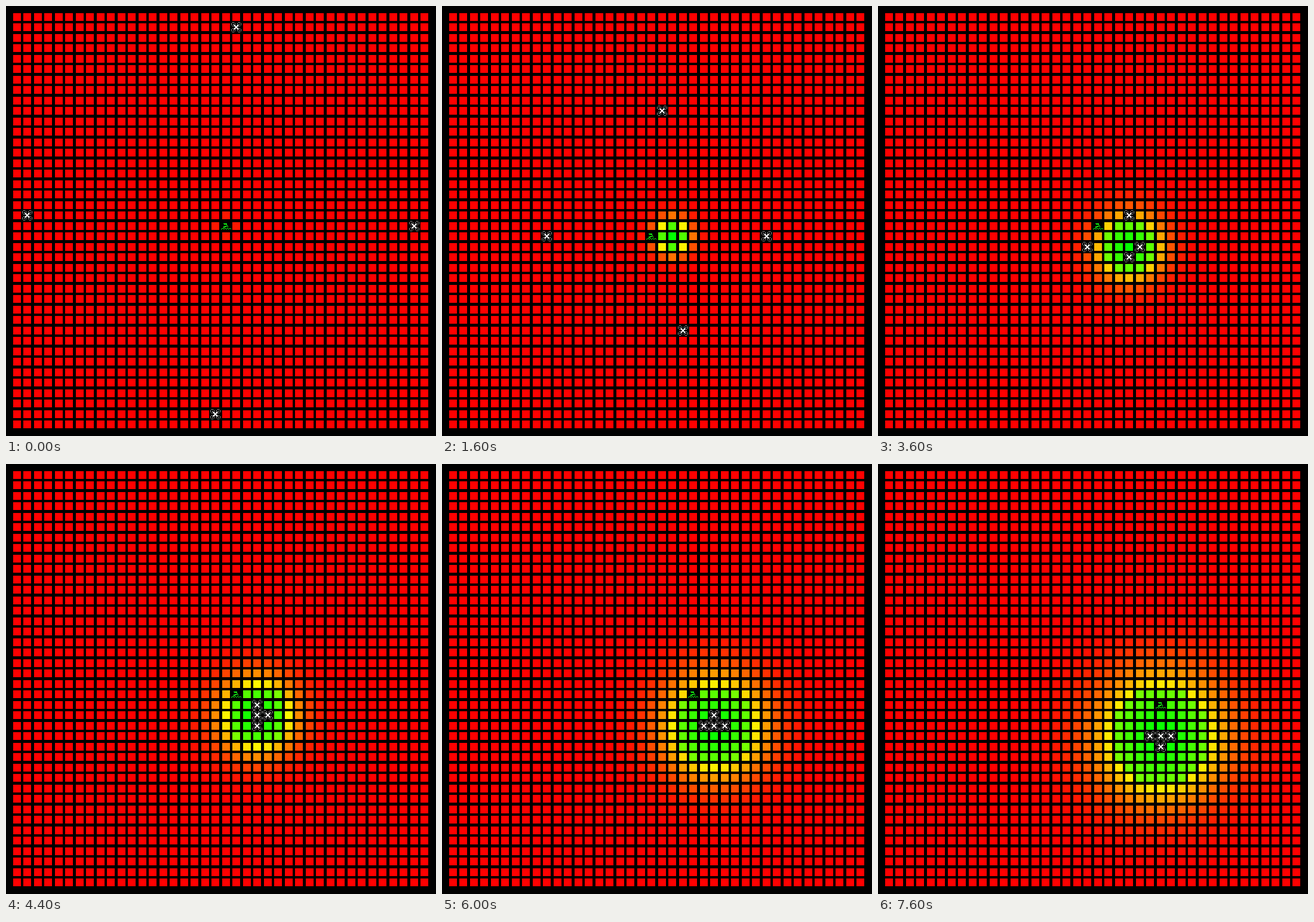
A matplotlib script for the animation above (8 s loop, 720x720 px).

```python
import numpy as np
import matplotlib.pyplot as plt
from matplotlib.animation import FuncAnimation

SIZE, CELLS, CELL, ICON = 720, 40, 13, 17
FRAMES, STEP_MS = 40, 200
HOLDS = (35, 39)  # frames that repeat the one before

# Swimmer waypoints: step, column, row
SWIM = np.array([(0, 20, 20), (8, 19, 21), (15, 20, 20), (22, 21, 21),
                 (27, 22, 21), (34, 25, 21), (38, 26, 22)]).T

# Drones: direction seen from the plume, and sideways sway
DRONES = [(-1, 0, -0.7), (0, 1, -1), (0, -1, 1), (1, 0, 0)]

START = np.floor(12 + 17.5 * np.arange(CELLS)).astype(int)
ROW, COL = np.mgrid[:CELLS, :CELLS]


def nearest(x):
    return int(np.floor(x + 0.5))


def line(img, x0, y0, x1, y1, color):
    n = max(abs(x1 - x0), abs(y1 - y0)) + 1
    xs = np.floor(np.linspace(x0, x1, n) + 0.5).astype(int)
    ys = np.floor(np.linspace(y0, y1, n) + 0.5).astype(int)
    img[ys, xs] = color


def drone_icon():
    y, x = np.mgrid[:ICON, :ICON] - ICON // 2
    ax, ay = abs(x), abs(y)
    rx, ry = ax - 5, ay - 5
    radius = np.hypot(rx, ry)
    ring = (radius > 3) & (radius < 3.4)
    arms = (ax == ay) & (ax <= 5)
    body = (abs(ax - ay) <= 1) & (np.maximum(ax, ay) <= 3)
    img = np.zeros((ICON, ICON, 3), np.uint8)
    img[ring | arms | body] = 255
    return img


def swimmer_icon():
    img = np.zeros((ICON, ICON, 3), np.uint8)
    green = (20, 255, 20)
    line(img, 4, 4, 9, 4, green)
    line(img, 5, 5, 9, 5, green)
    line(img, 9, 5, 11, 10, green)
    line(img, 4, 9, 9, 8, green)
    line(img, 4, 9, 4, 11, green)
    line(img, 5, 10, 8, 9, green)
    for x in range(ICON):
        img[13 if x % 4 < 2 else 12, x] = green
    return img


DRONE, MAN = drone_icon(), swimmer_icon()


def plume(step):
    """Centre cell of the drifting plume."""
    return 20 + step // 6, 20 + int(step / 6.5)


def heat(step):
    cx, cy = plume(step)
    sigma = 0.4 + 0.095 * step
    p = np.exp(-((COL - cx) ** 2 + (ROW - cy) ** 2) / (2 * sigma ** 2))
    likely = p > 0.5
    red = np.where(likely, 255 * (1 - p), 255)
    green = np.where(likely, 255, 510 * p)
    return np.dstack([red, green, 0 * red]).round().astype(np.uint8)


def swimmer_cell(step):
    return [nearest(np.interp(step, SWIM[0], axis)) for axis in SWIM[1:]]


def drone_cell(i, step):
    """Fly in one cell per step, then keep a place beside the plume centre."""
    dx, dy, sway = DRONES[i]
    cx, cy = plume(step)
    side = dx + dy
    centre = cx if dx else cy
    edge = 38 - step if side > 0 else 1 + step
    hub = i == max(0, step // 6 - 4)
    gap = max(0 if hub else 1, side * (edge - centre))
    fade = max(0, 15 - step) / 12
    drift = nearest(sway * np.cos(np.pi * step / 8) * fade)
    return cx + dx * gap + abs(dy) * drift, cy + dy * gap + abs(dx) * drift


def stamp(img, icon, col, row):
    x, y = START[col] - 2, START[row] - 2
    img[y:y + ICON, x:x + ICON] = icon


def render(frame):
    step = frame - (frame in HOLDS)
    img = np.zeros((SIZE, SIZE, 3), np.uint8)
    pix = (START[:, None] + np.arange(CELL)).ravel()
    img[np.ix_(pix, pix)] = heat(step).repeat(CELL, axis=0).repeat(CELL, axis=1)
    stamp(img, MAN, *swimmer_cell(step))
    for i in range(len(DRONES)):
        stamp(img, DRONE, *drone_cell(i, step))
    return img


fig = plt.figure(figsize=(SIZE / 100, SIZE / 100), dpi=100, facecolor="black")
picture = fig.figimage(render(0), origin="upper")


def update(frame):
    picture.set_data(render(frame))
    return [picture]


anim = FuncAnimation(fig, update, frames=FRAMES, interval=STEP_MS,
                     repeat=True, repeat_delay=0, blit=False)
plt.show()
```
